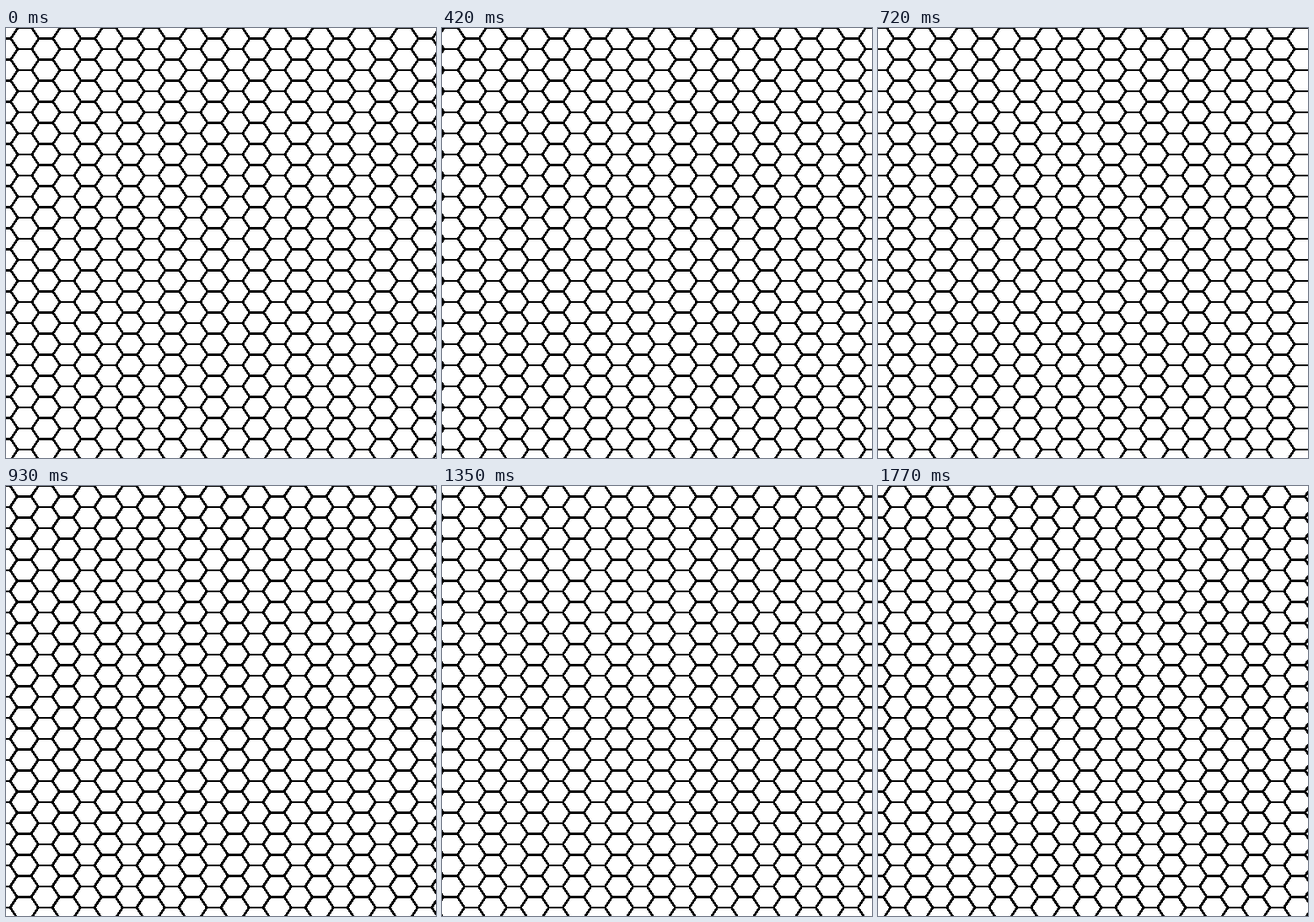
Recreate the animation shown at these times as an HTML page without scripts. Size 510 by 510 pixels, loop 1.8 s.

```html
<!DOCTYPE html>
<html lang="en">
<head>
<meta charset="utf-8">
<title>Honeycomb</title>
<style>
  @property --shift {
    syntax: "<length>";
    inherits: false;
    initial-value: 0px;
  }
  html, body {
    margin: 0;
    width: 100%;
    height: 100%;
    overflow: hidden;
    background: #fff;
  }
  svg {
    display: block;
    width: 510px;
    height: 510px;
  }
  /* The grid repeats every 50px, so one period closes the loop. */
  #grid {
    fill: none;
    stroke: #000;
    stroke-width: 2.8;
    shape-rendering: crispEdges;
    transform: translateX(var(--shift));
    animation: slide 1.8s steps(60) -5ms infinite;
  }
  @keyframes slide {
    from { --shift: 0px; }
    to { --shift: -50px; }
  }
</style>
</head>
<body>
<svg viewBox="0 0 510 510">
  <defs>
    <!-- one hexagon and the flat edge to its left -->
    <path id="cell" d="M0 0l8.333-12.5h16.667l8.333 12.5l-8.333 12.5h-16.667zM0 0h-16.667"/>
    <g id="pair"><use href="#cell"/><use href="#cell" x="50"/></g>
    <g id="four"><use href="#pair"/><use href="#pair" x="100"/></g>
    <g id="row"><use href="#four"/><use href="#four" x="200"/><use href="#four" x="400"/></g>
    <g id="rows2"><use href="#row"/><use href="#row" y="25"/></g>
    <g id="rows4"><use href="#rows2"/><use href="#rows2" y="50"/></g>
    <g id="rows8"><use href="#rows4"/><use href="#rows4" y="100"/></g>
  </defs>
  <g id="grid">
    <g transform="translate(-19.3 0)">
      <use href="#rows8"/>
      <use href="#rows8" y="200"/>
      <use href="#rows8" y="400"/>
    </g>
  </g>
</svg>
</body>
</html>
```
